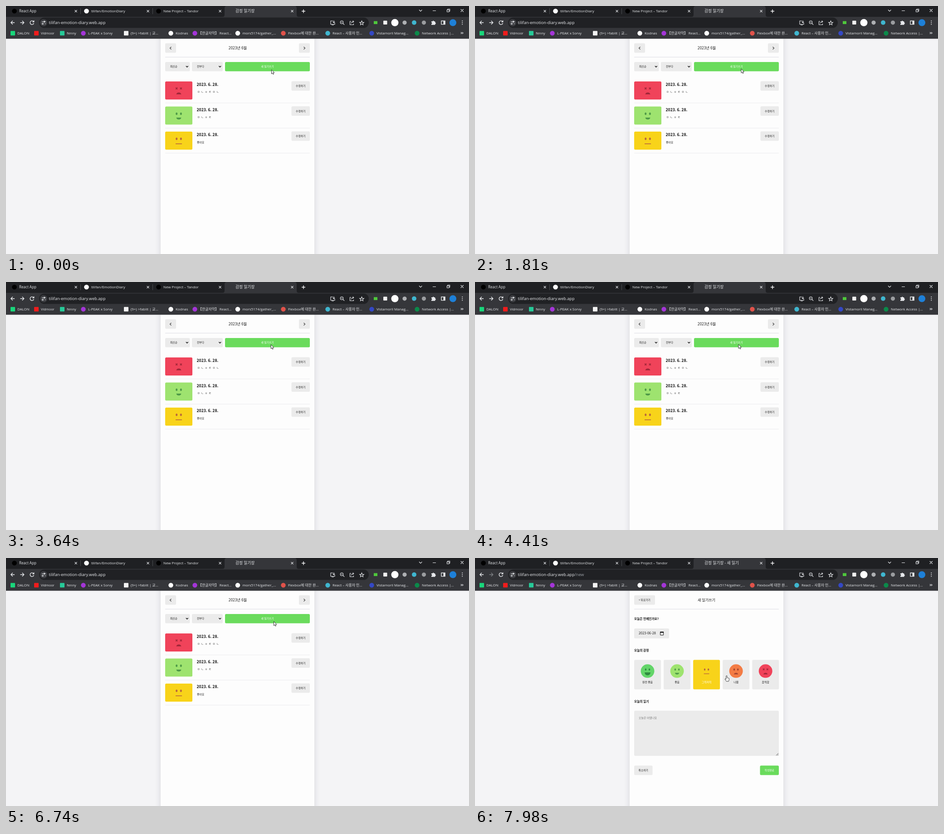
These frames come from a looping animation (1021x549 px, 8 s). An HTML page:

```html
<!DOCTYPE html>
<html lang="en">
<head>
<meta charset="utf-8">
<title>Diary</title>
<style>
html, body { margin: 0; width: 100%; height: 100%; overflow: hidden; background: #f4f4f6; }
svg { display: block; width: 1021px; height: 549px; }
text { white-space: pre; }
.ui { font-family: "Open Sans", "Noto Sans CJK KR", "Noto Sans CJK", sans-serif; }
.pen { font-family: "Noto Sans CJK KR", "Noto Sans CJK", sans-serif; }
.line { fill: none; stroke: #e8eaed; stroke-width: 1.1; }
.panel { filter: drop-shadow(0 3px 7px rgba(100, 100, 111, .2)); }
</style>
</head>
<body>
<svg id="stage" viewBox="0 0 1021 549" xmlns="http://www.w3.org/2000/svg"></svg>
<script>
const LOOP = 8000, OPEN_AT = 6900;
const GREY = '#ebebeb', GREEN = '#6adb5c', INK = '#1c1c1c', LIGHT = '#e8eaed';

const rect = (x, y, w, h, fill, r = 0, extra = '') =>
  `<rect x="${x}" y="${y}" width="${w}" height="${h}" rx="${r}" fill="${fill}" ${extra}/>`;
const dot = (x, y, r, fill) => `<circle cx="${x}" cy="${y}" r="${r}" fill="${fill}"/>`;
const square = (x, y, s, fill) => rect(x - s / 2, y - s / 2, s, s, fill, 1);
const line = (d, extra = '') => `<path class="line" d="${d}" ${extra}/>`;
const ui = (x, y, str, size = 8, fill = LIGHT, extra = '') =>
  `<text class="ui" x="${x}" y="${y}" font-size="${size}" fill="${fill}" ${extra}>${str}</text>`;
const pen = (x, y, str, size = 5.8, fill = INK, extra = '') =>
  `<text class="pen" x="${x}" y="${y}" font-size="${size}" fill="${fill}" ${extra}>${str}</text>`;
const mid = 'text-anchor="middle"', bold = 'font-weight="700"';
const button = (x, y, w, h, label, fill = GREY, color = INK) =>
  rect(x, y, w, h, fill, 2.5) + pen(x + w / 2, y + h / 2 + 2.1, label, 5.8, color, mid);

const moods = [
  { label: '완전 좋음', skin: '#63d569', ink: '#2f8a3f', mouth: 'M-7.5 3.5H7.5Q7 11 0 11Q-7 11 -7.5 3.5Z' },
  { label: '좋음', skin: '#9ee36f', ink: '#4f9a48', mouth: 'M-5.5 4.5H5.5Q4.5 8.8 0 8.8Q-4.5 8.8 -5.5 4.5Z' },
  { label: '그럭저럭', skin: '#f8d31a', ink: '#b9683c', mouth: 'M-7 6.3H7V7.9H-7Z' },
  { label: '나쁨', skin: '#f37c45', ink: '#a1432f', mouth: 'M-5.5 8.5Q-4.5 4.5 0 4.5Q4.5 4.5 5.5 8.5Z' },
  { label: '끔찍함', skin: '#f0435a', ink: '#9f2638', mouth: 'M-5.5 8.5Q-4.5 4.5 0 4.5Q4.5 4.5 5.5 8.5Z' }
];

function face(mood, x, y, scale, round) {
  const crossed = mood === moods[4];
  const eyes = [-4.8, 4.8].map(ex => crossed
    ? `<path d="M${ex - 2} -6.5L${ex + 2} -2.5M${ex + 2} -6.5L${ex - 2} -2.5" stroke="${mood.ink}" stroke-width="1.6"/>`
    : `<ellipse cx="${ex}" cy="-4" rx="2" ry="2.8" fill="${mood.ink}"/>`).join('');
  return `<g transform="translate(${x} ${y}) scale(${scale})">` +
    (round ? dot(0, 0, 17.6, mood.skin) : '') + eyes +
    `<path d="${mood.mouth}" fill="${mood.ink}"/></g>`;
}

function listPage() {
  const arrow = (x, s) => line(`M${x - s} 90.5L${x + s} 93.3L${x - s} 96`, 'style="stroke:#333"');
  const select = (x, w, label) => rect(x, 124, w, 20.5, GREY, 2.5) + pen(x + 11, 136.3, label) +
    line(`M${x + w - 8.6} 132.8l2.4 2.4l2.4 -2.4`, 'style="stroke:#111;stroke-width:1.4"');
  const rows = [[moods[4], 'ㅁㄴㅇㅌㅁㄴ'], [moods[1], 'ㅁㄴㅇㅌ'], [moods[2], '좋아요']];
  return rect(351, 82.5, 24, 21, GREY, 2.5) + rect(646, 82.5, 24, 21, GREY, 2.5) +
    arrow(363, -1.5) + arrow(658, 1.5) +
    pen(511, 96.3, '2023년 6월', 8.4, INK, mid) +
    select(351, 54.5, '최신순') + select(410, 68, '전부다') +
    button(483, 124, 187, 20.5, '새 일기쓰기', GREEN, '#fff') +
    rows.map(([mood, note], i) => {
      const y = 167 + i * 55.5;
      return rect(351, y, 60, 40, mood.skin, 2.5) + face(mood, 381, y + 20, 1) +
        pen(420.5, y + 10.3, '2023. 6. 28.', 8.6, '#111', bold) +
        pen(i < 2 ? 422 : 421, y + (i < 2 ? 25 : 25.5), note, 5.8, INK, i < 2 ? 'letter-spacing="3.1"' : '') +
        button(629.5, y - .5, 40.5, 21, '수정하기') +
        rect(351, y + 47.2, 319, 1, '#ebebee');
    }).join('');
}

function newPage() {
  const heading = (y, label) => pen(351, y, label, 6.7, '#111', bold);
  return button(351, 82.5, 46, 21, '&lt; 뒤로가기') +
    pen(510.5, 96, '새 일기쓰기', 8.1, INK, mid) +
    heading(137, '오늘은 언제인가요?') +
    rect(351, 156, 77, 22, GREY, 2.5) + pen(361, 169.4, '2023-06-28', 7.4) +
    rect(408.6, 163.8, 7, 7, 'none', .5, 'stroke="#111"') + rect(408.2, 163, 7.8, 2.4, '#111') +
    heading(206.5, '오늘의 감정') +
    moods.map((mood, i) => {
      const x = 351 + i * 65.05, on = i === 2;
      return rect(x, 225.5, 59, 65.3, on ? mood.skin : GREY, 2.5) +
        face(mood, x + 29.5, 250.3, .85, !on) +
        pen(x + 29.5, 277.4, mood.label, 5.9, on ? '#fff' : INK, mid);
    }).join('') +
    heading(319.5, '오늘의 일기') +
    rect(351, 338, 319, 100, GREY, 2.5) + pen(361, 355.6, '오늘은 어땠나요', 6, '#777') +
    line('M664 437.2l5 -5M667 437.2l2 -2', 'style="stroke:#444;stroke-width:.9"') +
    button(351, 459.5, 40.5, 21, '취소하기') +
    button(628.5, 459.5, 41.5, 21, '작성완료', GREEN, '#fff');
}

function tabs() {
  const close = x => line(`M${x - 2.4} 8.9l5 5M${x + 2.6} 8.9l-5 5`);
  return rect(0, 0, 1021, 24, '#1f2023') +
    '<path d="M478 24Q482 24 482 19V5Q482 0 487 0H636Q641 0 641 5V19Q641 24 645 24Z" fill="#35363a"/>' +
    rect(164, 5, 1, 13, '#4a4c50') + rect(323, 5, 1, 13, '#4a4c50') +
    dot(18.5, 11.3, 5.3, '#000') + ui(29, 14.2, 'React App', 8.1) +
    dot(177.5, 11.3, 5.3, '#fff') + ui(188, 14.2, 'tilifan/EmotionDiary', 8) +
    dot(336.5, 11.3, 5.3, '#000') + ui(347, 14.2, 'New Project – Tandor', 7.9) +
    ui(506, 14.2, '', 8.7, LIGHT, 'id="title"') +
    [154, 313, 472, 631].map(close).join('') +
    line('M652 11.5h8M656 7.5v8', 'style="stroke:#fff;stroke-width:1.4"') +
    line('M911 8.5l3.2 3.2l3.2 -3.2M941 10.5h7M972.5 8.5h4.5v4.5h-4.5zM974 8.3v-1.5h4.7v4.7h-1.5M1002.8 7l6 6M1008.8 7l-6 6');
}

function toolbar() {
  let star = '';
  for (let i = 0; i < 10; i++) {
    const a = -Math.PI / 2 + i * Math.PI / 5, r = i % 2 ? 2.1 : 5;
    star += (i ? 'L' : 'M') + (784.5 + r * Math.cos(a)).toFixed(2) + ' ' + (37.8 + r * Math.sin(a)).toFixed(2);
  }
  return rect(0, 24, 1021, 48.5, '#35363a') + rect(73, 25.5, 727, 23, '#202124', 11.5) +
    line('M19 36.8h-8M14.8 32.8l-4 4l4 4', 'style="stroke-width:1.4"') +
    line('M31.5 36.8h8M35.7 32.8l4 4l-4 4', 'id="forward" style="stroke-width:1.4"') +
    line('M60.6 34.2A4.2 4.2 0 1 0 61.4 38M61.6 32v3.2h-3.2', 'style="stroke-width:1.4"') +
    dot(83, 37, 8, '#3c3d41') +
    line('M79 34.8h3.4M85.5 39.2h2M79 39.2h1M84 34.8h3.5') +
    '<g class="line"><circle cx="84.5" cy="34.8" r="1.4"/><circle cx="81" cy="39.2" r="1.4"/></g>' +
    `<text class="ui" x="94.5" y="40.2" font-size="9.1" fill="#e8eaed">tilifan-emotion-diary.web.app<tspan id="path" fill="#9aa0a6"></tspan></text>` +
    line('M721 33h-5v7.5h9v-3M718 42h5M723 32v5M720.8 35l2.2 2.2l2.2 -2.2') +
    line('M743 38.5l3.2 3.2M738.8 36h3.4') + '<circle class="line" cx="740.5" cy="36" r="3.3"/>' +
    line('M761 34h-2.5v7.5h8v-2.5M761.5 38.5q.5 -4 5 -4M764.5 32.3l2.4 2.2l-2.4 2.2') +
    line(star + 'Z') +
    rect(811, 33.5, 8, 6.5, '#4fc83c') + square(836.3, 36.8, 8.5, '#f1f1f1') +
    dot(857.5, 36.8, 8, '#fff') + dot(879, 36.8, 4.6, '#aeb0b3') + dot(900, 36.8, 5, '#3fb6cf') +
    dot(921.5, 36.8, 4.6, '#9b9da0') +
    '<path d="M938 34h2.7a1.6 1.6 0 1 1 3.2 0h2.4v2.6a1.6 1.6 0 1 1 0 3.2v2h-8.3v-2.4a1.6 1.6 0 0 0 0 -3.2z" fill="#e8eaed"/>' +
    line('M960 33h8v7.6h-8z', 'style="stroke-width:1.4"') + rect(964.5, 33, 4, 7.6, LIGHT) +
    dot(985.5, 36.8, 7.6, '#1e80d8') +
    [33, 36.8, 40.6].map(y => dot(1006.3, y, 1, LIGHT)).join('');
}

function bookmarks() {
  const items = [
    [15, square, '#19d67b', 25, 'DALON'], [67, square, '#f01c1c', 77, 'Vidmoor', 7.4],
    [124, square, '#27c998', 134, 'fenny'], [170.5, dot, '#a435d8', 181, 'L-PEAK x Sorvy'],
    [265, square, '#f4f4f4', 275, '(9+) &gt;fablit | 교...'], [363.5, dot, '#fff', 374, 'Kodnas'],
    [416.5, dot, '#a435d8', 424, '【한글자막】 React...'], [511, dot, '#fff', 521.5, 'mors5174/gather_...'],
    [611.5, dot, '#e0524a', 622, 'Flexbox에 대한 완...'], [709.5, dot, '#3fb6cf', 720, 'React – 사용자 인...'],
    [806.5, dot, '#3448c5', 817, 'Vistamoril Manag...'], [906.5, dot, '#0b8a4a', 917, 'Network Access |...']
  ];
  return items.map(([x, mark, fill, tx, label, size = 7.9]) =>
    mark(x, 60.3, mark === dot ? 5.2 : 10, fill) + ui(tx, 63.1, label, size)).join('') +
    line('M1003 57.8l2 2l-2 2M1006 57.8l2 2l-2 2');
}

const stage = document.getElementById('stage');
stage.innerHTML = rect(0, 0, 1021, 549, '#f4f4f6') +
  rect(341, 60, 339, 520, '#fdfdfd', 0, 'class="panel"') +
  rect(351, 112.6, 319, 1.2, '#e2e2e8') +
  `<g id="list">${listPage()}</g><g id="new">${newPage()}</g>` +
  tabs() + toolbar() + bookmarks() +
  `<g id="pointer" fill="#fff" stroke="#111" stroke-width=".8" stroke-linejoin="round">
    <path id="arrow" d="M0 0V9.2L2.1 7.3L3.5 10.4L5 9.7L3.6 6.7H6.4Z"/>
    <path id="hand" d="M-1.1 1Q-1.1 0 0 0T1.1 1V4.6Q2.2 4.1 2.7 5Q3.8 4.6 4.3 5.5Q5.5 5.3 5.5 6.6V9Q5.2 10.8 4.4 12.5H-.5Q-1.5 10.8 -3.3 8.5Q-4 7.2 -3 6.8Q-2.1 6.8 -1.1 8Z"/>
  </g>`;
const $ = id => document.getElementById(id);
const show = (id, on) => $(id).setAttribute('visibility', on ? 'visible' : 'hidden');

// time, x, y of the pointer tip
const stops = [
  [0, 585.5, 141], [540, 585.5, 141], [1340, 587, 139], [3040, 587, 139], [4300, 581, 138],
  [4800, 581, 138], [5500, 601.8, 188.3], [6100, 601.8, 188.3], [6600, 590.5, 140.5],
  [6950, 590.5, 140.5], [7700, 554.8, 260.5], [LOOP, 554.8, 260.5]
];

function pointerAt(t) {
  const i = stops.findIndex(s => s[0] > t);
  const [t0, x0, y0] = stops[i - 1], [t1, x1, y1] = stops[i];
  const u = (t - t0) / (t1 - t0), k = u * u * (3 - 2 * u);
  return [x0 + (x1 - x0) * k, y0 + (y1 - y0) * k];
}

function draw(t) {
  const writing = t >= OPEN_AT, [x, y] = pointerAt(t);
  const hand = y > (writing ? 225 : 158);
  show('list', !writing);
  show('new', writing);
  show('arrow', !hand);
  show('hand', hand);
  $('pointer').setAttribute('transform', `translate(${x.toFixed(2)} ${y.toFixed(2)})`);
  $('title').textContent = writing ? '감정 일기장 - 새 일기' : '감정 일기장';
  $('path').textContent = writing ? '/new' : '';
  $('forward').style.stroke = writing ? '#7d8084' : LIGHT;
}

const start = performance.now();
function tick() {
  draw((performance.now() - start) % LOOP);
  requestAnimationFrame(tick);
}
draw(0);
requestAnimationFrame(tick);
</script>
</body>
</html>
```
